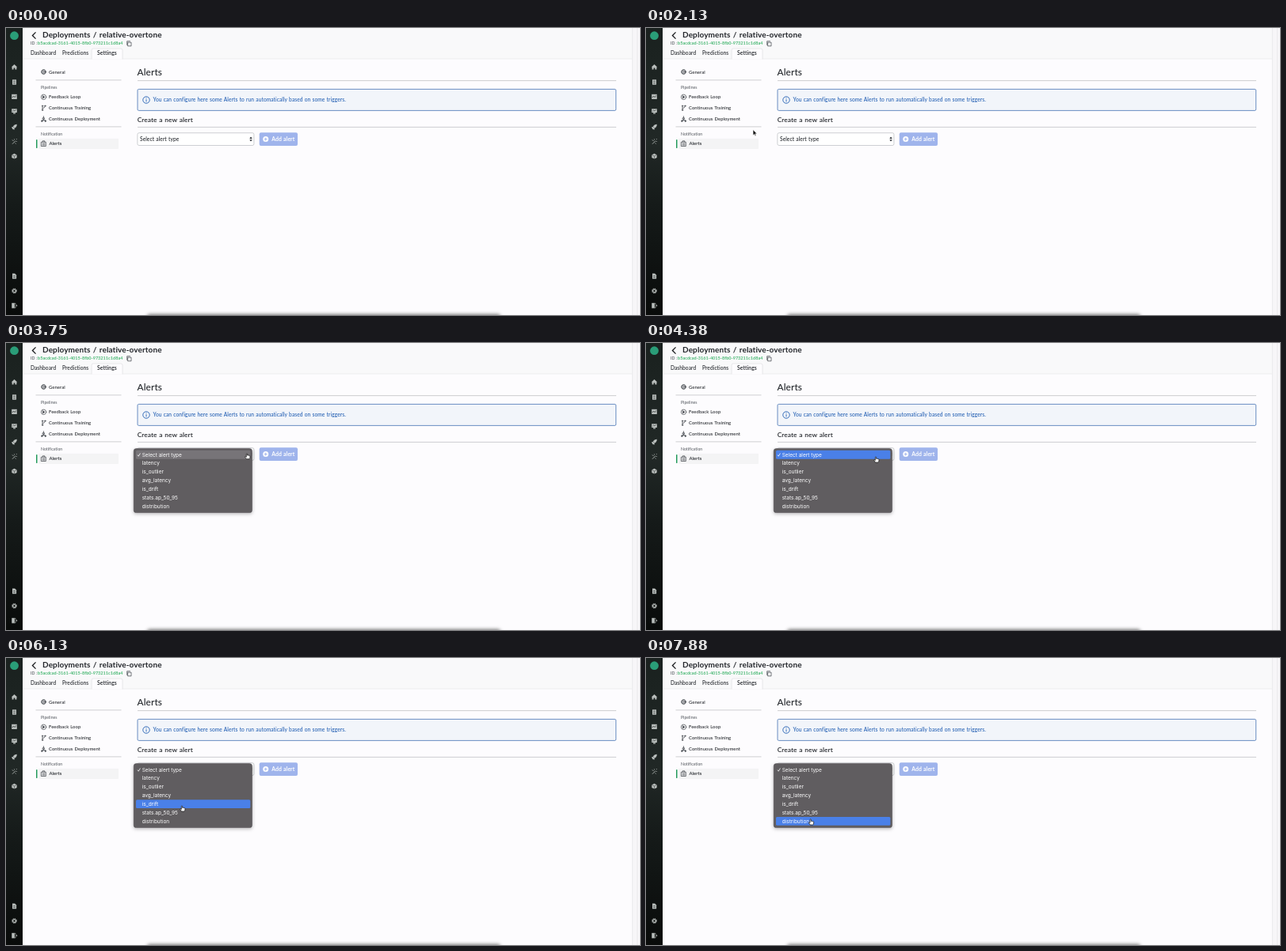
An HTML page that plays this animation: 800x363 px, repeating every 8 s.

```html
<!DOCTYPE html>
<html lang="en">
<head>
<meta charset="utf-8">
<title>Deployment alerts</title>
<style>
  html, body { margin: 0; width: 100%; height: 100%; overflow: hidden; background: #fdfcfe; }
  svg { display: block; width: 100%; height: 100%; }
  text { font-family: Lato, "Open Sans", sans-serif; font-weight: 500; font-size: 6.6px; letter-spacing: .011em; word-spacing: .07em; fill: #23262b; white-space: pre; }
  .b { font-weight: 700; }
  .s { font-weight: 600; }
  .nav { font-size: 5.9px; }
  .cap { font-size: 5.1px; fill: #5c6066; }
  .rule { stroke: #c9cacc; stroke-width: .9; }
  .line { fill: none; stroke: #3c4046; stroke-width: .7; stroke-linecap: round; stroke-linejoin: round; }
  .side { fill: none; stroke: #b9bebc; stroke-width: .9; stroke-linejoin: round; }
  .side .f { fill: #b9bebc; stroke: none; }
  #menu text { font-family: Inter, sans-serif; font-weight: 400; font-size: 6.5px; letter-spacing: 0; word-spacing: 0; fill: #fff; }
</style>
</head>
<body>
<svg viewBox="0 0 800 363" preserveAspectRatio="none">
  <defs>
    <linearGradient id="dark" x1="0" y1="0" x2="0" y2="1">
      <stop offset="0" stop-color="#1a211f"/>
      <stop offset=".4" stop-color="#212826"/>
      <stop offset=".62" stop-color="#151a19"/>
      <stop offset="1" stop-color="#090b0a"/>
    </linearGradient>
    <filter id="soft" x="-10%" y="-200%" width="120%" height="500%"><feGaussianBlur stdDeviation="2"/></filter>
    <filter id="drop" x="-10%" y="-10%" width="120%" height="130%">
      <feDropShadow dx="0" dy="1.5" stdDeviation="2" flood-color="#000" flood-opacity=".28"/>
    </filter>
  </defs>

  <!-- page -->
  <rect width="800" height="363" fill="#fdfcfe"/>
  <rect x="21" width="769" height="39" fill="#f9f9fa"/>
  <path d="M21 39H790" stroke="#e9e9eb" stroke-width=".8"/>
  <path d="M108 39.5V28q0-2 2-2h35q2 0 2 2v11.5" fill="#fdfcfe" stroke="#e2e2e5" stroke-width=".8"/>
  <rect x="790" width="10" height="363" fill="#f7f6f8"/>
  <path d="M790.4 0V363M796.5 0V363" stroke="#e8e7ea" stroke-width=".8"/>

  <!-- icon rail -->
  <rect width="21" height="363" fill="url(#dark)"/>
  <circle cx="10.5" cy="9.7" r="5.4" fill="#2a9d78"/>
  <g class="side">
    <path class="f" d="M7 49.3l3.5-3.3 3.5 3.3-.6.5v2.7h-2v-2h-1.8v2h-2v-2.7z"/>
    <path class="f" d="M8 65.3h5v6.4H8z"/>
    <path d="M9 67.3h3M9 69.7h3" stroke="#222826" stroke-width=".6"/>
    <path class="f" d="M7.2 83.8h6.6v6.2H7.2z"/>
    <path d="M8 88l1.6-2 1.5 1.6 1.8-2.3" stroke="#222826" stroke-width=".7"/>
    <path class="f" d="M7.2 102.3h6.6v4.6H7.2zM9 107.2h3v1.2H9z"/>
    <path d="M8.2 105.4l1.5-1.4 1.3 1 1.6-1.6" stroke="#222826" stroke-width=".6"/>
    <path class="f" d="M13.8 121.8q-3.5 0-5 3l2 2q3-1.500 3-5zM7.200 125h1.500l2 2v1.500q-3 .3-3.500-3.500z"/>
    <path d="M8 146.700l4-4M8 141.500l1.500 1.500M12.500 146.500l-1-1M10.500 140.500v1M13.700 143.500h-1M12.800 141l.8-.8"/>
    <path class="f" d="M10.500 158.800l3.200 1.700v3.400l-3.200 1.700-3.200-1.700v-3.400z"/>
    <path d="M7.500 160.600l3 1.500 3-1.500M10.500 162.100v3.300" stroke="#222826" stroke-width=".5"/>
    <path class="f" d="M8 310.500h3.200l1.900 1.900v4.800H8z"/>
    <path d="M9 313.600h3M9 315.400h3" stroke="#111514" stroke-width=".5"/>
    <circle cx="10.500" cy="332.500" r="1.900" stroke-width="1.300"/>
    <circle cx="10.500" cy="332.500" r="3" stroke-dasharray="1.180 1.176" stroke-width="1"/>
    <path class="f" d="M7.300 347.800h3.500v6.600H7.300z"/>
    <path d="M10.800 348.300h1.200v1.500M10.800 353.900h1.200v-1.500M11.300 351.100h2.700m-1.100-1.200l1.200 1.200-1.200 1.200" stroke-width=".7"/>
  </g>

  <!-- header -->
  <path d="M37.500 5.400L33.400 9.500l4.100 4.100" fill="none" stroke="#17191c" stroke-width="1.300"/>
  <text class="b" x="46" y="12" style="font-size:10px">Deployments / relative-overtone</text>
  <text class="s" x="31" y="21.400" style="font-size:5.200px;fill:#5c6066">ID :</text>
  <text class="b" x="40" y="21.400" style="font-size:5.480px;fill:#48b873">b5acdcad-3161-4015-8fb0-973211c1d8a4</text>
  <g class="line" stroke-width=".6"><path d="M154 18.200h4v4.600h-4zM152.700 21.400v-4.700h3.800"/></g>
  <text x="31" y="34.200">Dashboard</text>
  <text x="71" y="34.200">Predictions</text>
  <text class="s" x="115" y="34.400" style="font-size:6.800px">Settings</text>

  <!-- settings list -->
  <g class="line">
    <circle cx="47.500" cy="55.500" r="2.900" stroke-dasharray="1.300 .978" stroke-width=".8"/>
    <circle cx="47.500" cy="55.500" r="2.300"/><circle cx="47.500" cy="55.500" r=".9"/>
    <circle cx="47.500" cy="87.300" r="3.200"/>
    <path d="M46.700 85.900l2.200 1.400-2.200 1.400z" fill="#3c4046"/>
    <path d="M46 99.300v4M49.300 99.300q0 2-3.200 2.300"/>
    <circle cx="46" cy="98.500" r=".7"/><circle cx="49.300" cy="98.500" r=".7"/><circle cx="46" cy="103.800" r=".7"/>
    <path d="M47.500 111.700v2M46.400 113.800h2.200v1.300h-2.200zM45.300 118.200v-1.500h4.400v1.500M47.500 115.200v1.500"/>
    <circle cx="45.300" cy="117.700" r=".8"/><circle cx="49.700" cy="117.700" r=".8"/>
  </g>
  <path class="rule" d="M37.500 65.900H145.500M37.500 124.900H145.500"/>
  <rect id="row" x="41" y="139.800" width="101" height="13.200" rx="1" fill="#f4f4f5"/>
  <rect x="38" y="141.200" width="1.500" height="10.700" fill="#22995b"/>
  <g class="line"><path d="M44.700 144.300h5.600v5.200h-5.600zM46.200 144.200v-1.400h2.600v1.400M46 146.400h3M46 148h3"/></g>
  <text class="nav" x="54" y="57.600">General</text>
  <text class="cap" x="44" y="76.500">Pipelines</text>
  <text class="nav" x="54" y="89.300">Feedback Loop</text>
  <text class="nav" x="54" y="103">Continuous Training</text>
  <text class="nav" x="54" y="116.700">Continuous Deployment</text>
  <text class="cap" x="44" y="136.200">Notification</text>
  <text class="nav s" x="54.500" y="148.200">Alerts</text>

  <!-- content -->
  <text x="165.500" y="59.800" style="font-size:11.800px">Alerts</text>
  <path class="rule" d="M166 66.600H770M166 125.400H770"/>
  <rect x="166" y="77.400" width="603.700" height="27" rx="1.500" fill="#f2f5fa" stroke="#5b83bb" stroke-width=".9"/>
  <circle cx="177" cy="91" r="4.200" fill="none" stroke="#2460b4" stroke-width=".9"/>
  <path d="M177 90.300v3M177 88.400v.9" stroke="#2460b4" stroke-width=".9"/>
  <text x="185.500" y="93.200" style="fill:#2460b4">You can configure here some Alerts to run automatically based on some triggers.</text>
  <text class="s" x="165.700" y="119.300" style="font-size:8.300px">Create a new alert</text>
  <rect x="165.900" y="132.700" width="147" height="15.800" rx="2" fill="#fff" stroke="#c2c4c8" stroke-width=".8"/>
  <text x="169" y="142.700">Select alert type</text>
  <path d="M307.300 139.900l1.700-2.300 1.700 2.300zM307.300 141.300l1.700 2.300 1.700-2.300z" fill="#2b2e33"/>
  <rect x="319.700" y="132.300" width="48.300" height="16.600" rx="2" fill="#9fb4ec"/>
  <circle cx="327.700" cy="140.600" r="3.500" fill="#fff"/>
  <path d="M327.700 138.700v3.800M325.800 140.600h3.800" stroke="#9fb4ec" stroke-width=".9"/>
  <text class="b" x="335.300" y="142.800" style="font-size:6.800px;fill:#fff">Add alert</text>

  <rect x="178" y="362" width="446" height="9" rx="4" fill="#777" filter="url(#soft)"/>

  <g id="menu">
    <rect x="161.200" y="133.600" width="149.300" height="81" rx="3.200" fill="#605d61" stroke="#4c494d" stroke-width=".5" filter="url(#drop)"/>
    <rect id="mark" x="164" width="144.300" height="10.850" rx="1.500"/>
    <path d="M166 141.600l1.200 1.600 2.200-3.700" fill="none" stroke="#fff" stroke-width=".8"/>
  </g>

  <!-- pointers, each with its tip at 0,0 -->
  <g id="hand" fill="#fff" stroke="#111" stroke-width=".7" stroke-linejoin="round">
    <path d="M-.7.3q.7-.8 1.300 0V2.400q.7-.4 1.200.1.700-.3 1.100.2.900-.2 1 .6V5q0 1.300-.9 2H-.6Q-1.300 5.800-2.300 4.600-2.500 3.500-1.500 3.900L-.7 4.600z"/>
  </g>
  <g id="beam" fill="none" stroke="#222" stroke-width=".7">
    <path d="M-1.300-3.300q1.300 0 1.300.8 0-.8 1.300-.8M0-2.500V2.500M-1.300 3.300q1.300 0 1.300-.8 0 .8 1.300.8M-.7.9H.7"/>
  </g>
  <g id="arrow" fill="#111" stroke="#fff" stroke-width=".5"><path d="M0 0V7l1.600-1.500 1.100 2.400 1.100-.5-1.100-2.300h2.200z"/></g>
</svg>
<script>
  const LOOP = 8000, STEP = 125;
  const ROW_TOP = 135.800, ROW_H = 10.850, MENU_AT = 3500, HOVER_AT = 4250;
  const $ = id => document.getElementById(id);
  const [menu, mark, row] = ["menu", "mark", "row"].map($);
  const pointers = ["hand", "beam", "arrow"].map($);

  ["Select alert type", "latency", "is_outlier", "avg_latency", "is_drift", "stats.ap_50_95", "distribution"].forEach((label, i) => {
    const t = document.createElementNS("http://www.w3.org/2000/svg", "text");
    t.setAttribute("x", 171.700);
    t.setAttribute("y", ROW_TOP + i * ROW_H + 7.700);
    t.textContent = label;
    menu.append(t);
  });

  // time, x, y of the pointer tip
  const path = [
    [375, -6, 112], [1125, 60, 142], [1500, 60.500, 142], [2250, 150, 126],
    [2750, 209, 121], [2875, 209.500, 121], [3125, 264, 128], [3375, 304, 139.500],
    [4250, 304, 140], [4625, 262, 152], [5000, 227.500, 165], [5375, 227, 166],
    [6000, 224, 175.500], [6125, 222, 187], [6500, 219, 188], [6750, 217, 191],
    [7500, 211, 196], [7625, 209, 202], [7875, 207.700, 204]
  ];

  function locate(t) {
    const i = path.findIndex(p => p[0] > t);
    if (i === 0) return path[0].slice(1);
    if (i < 0) return path[path.length - 1].slice(1);
    const [a, b] = [path[i - 1], path[i]];
    const k = (t - a[0]) / (b[0] - a[0]);
    return [a[1] + (b[1] - a[1]) * k, a[2] + (b[2] - a[2]) * k];
  }

  function shape(t, x, y) {
    if (t < path[0][0]) return "";
    if (t >= MENU_AT) return "hand";
    if (x > 41 && x < 142 && y > 139.800 && y < 153) return "hand";
    if (x > 166 && x < 236 && y > 112 && y < 123) return "beam";
    return x > 166 && x < 313 && y > 132.700 ? "hand" : "arrow";
  }

  function draw(now) {
    const t = Math.floor((now % LOOP) / STEP) * STEP;
    const [x, y] = locate(t);
    const kind = shape(t, x, y);
    for (const p of pointers) {
      p.style.display = p.id === kind ? "" : "none";
      p.setAttribute("transform", `translate(${x} ${y})`);
    }
    row.setAttribute("fill", kind === "hand" && x < 142 ? "#f0f0f1" : "#f4f4f5");
    menu.style.display = t >= MENU_AT ? "" : "none";
    const index = Math.max(0, Math.min(6, Math.floor((y - ROW_TOP) / ROW_H)));
    mark.setAttribute("y", ROW_TOP + index * ROW_H);
    mark.setAttribute("fill", t < HOVER_AT ? "#777478" : "#4a80e8");
  }

  const start = performance.now();
  function tick() {
    draw(performance.now() - start);
    requestAnimationFrame(tick);
  }
  tick();
</script>
</body>
</html>
```
